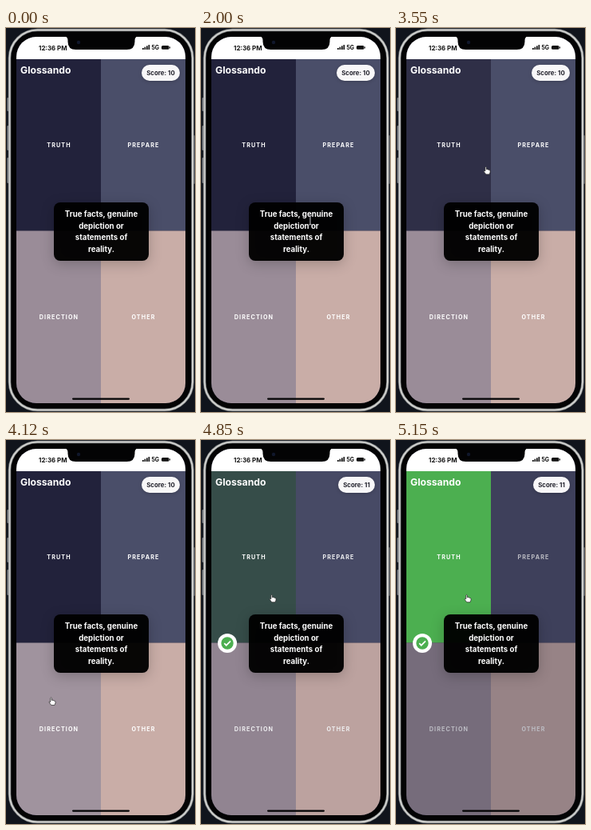
An HTML page for the animation above (6030 ms loop, 237x480 px).

```html
<!DOCTYPE html>
<html lang="en">
<head>
<meta charset="utf-8">
<title>Word quiz</title>
<style>
html, body { margin: 0; width: 100%; height: 100%; overflow: hidden; background: #10141c; }
svg { display: block; width: 237px; height: 480px; font-family: Inter, "Open Sans", sans-serif; font-weight: 700; }
.label { font-size: 7.2px; letter-spacing: 1.1px; fill: #fff; text-anchor: middle; }
.clue { font-size: 9.7px; fill: #fff; text-anchor: middle; }
.popup { filter: drop-shadow(0 4px 8px rgba(0, 0, 0, .22)); }
.pill { filter: drop-shadow(0 1px 2px rgba(0, 0, 0, .2)); }
</style>
</head>
<body>
<svg viewBox="0 0 237 480">
  <defs>
    <clipPath id="screen"><rect x="13" y="11" width="212" height="458" rx="25"/></clipPath>
  </defs>
  <g fill="#8f9397">
    <rect x="1.5" y="87" width="2" height="17" rx="1"/>
    <rect x="1.5" y="122" width="2" height="31" rx="1"/>
    <rect x="1.5" y="162" width="2" height="32" rx="1"/>
    <rect x="235" y="134" width="1.5" height="61" rx=".7"/>
  </g>
  <rect x="4.500" y="2.500" width="229.500" height="475" rx="35" fill="#030304" stroke="#74777a" stroke-width="3.500"/>
  <rect x="4.500" y="2.500" width="229.500" height="475" rx="35" fill="none" stroke="#cfd0cd" stroke-width="2"/>

  <g clip-path="url(#screen)">
    <rect x="13" y="11" width="213" height="459" fill="#22223b"/>
    <g id="tiles"></g>
    <rect x="13" y="11" width="213" height="28" fill="#fff"/>
    <path d="M73 10Q77.500 11 77.500 15V17Q77.500 27 87.500 27H151.500Q161.500 27 161.500 17V15Q161.500 11 166 10Z" fill="#030304"/>
    <circle cx="91" cy="18" r="2.200" fill="#10172b"/>
    <text x="41" y="28" font-size="7.9" fill="#111">12:36 PM</text>
    <g fill="#111">
      <g id="bars"></g>
      <text x="182.500" y="27" font-size="7">5G</text>
      <rect x="195" y="22" width="9.500" height="4.700" rx="1.500"/>
      <rect x="205" y="23.200" width="1" height="2.300" rx=".5"/>
    </g>
    <text x="18" y="56.500" font-size="12.2" fill="#fff">Glossando</text>
    <rect id="pill" class="pill" y="46" height="20" rx="10" fill="#f8f7f8"/>
    <text id="score" y="59" font-size="7.9" fill="#22222c" text-anchor="middle"></text>
    <rect x="83" y="462.500" width="72" height="2.200" rx="1.100" fill="#030304"/>
  </g>

  <rect class="popup" x="60" y="218" width="119" height="73" rx="8" fill="#000" fill-opacity=".96"/>
  <g id="clue" class="clue"></g>

  <g id="badge" transform="translate(33 254)">
    <circle r="12" fill="#fff"/>
    <circle r="7.700" fill="#4caf50"/>
    <path d="M-3.800 .2L-1.300 2.700L4-2.600" fill="none" stroke="#fff" stroke-width="1.700"/>
  </g>

  <path id="arrow" d="M-2-5V4.500L.2 2.600L1.600 6L3 5.400L1.600 2.200H4.500Z" fill="#111" stroke="#e4e4e4" stroke-width=".8"/>
  <path id="beam" d="M-2.300-6Q0-6 0-4.500Q0-6 2.300-6M0-4.500V4.500M-2.300 6Q0 6 0 4.500Q0 6 2.300 6" fill="none" stroke="#a9a9ad" stroke-width="1.200"/>
  <path id="hand" d="M-2.200.8V-4Q-1.500-5.200-.7-4V-1.300Q.3-2 1-1Q2-1.500 2.600-.5Q3.900-.7 4 .6V2.200L3 4.800H-1.200L-3.900 1.300Q-4-.3-2.200.8Z" fill="#fff" stroke="#222" stroke-width=".7"/>
</svg>
<script>
const LOOP = 6030, ENTER = 730, CLICK = 4760, FADE = 390;
const SPLIT_X = 119, SPLIT_Y = 253.5;

// Stops of the pointer: [time, x, y]
const STOPS = [
  [ENTER, 236, 190], [880, 167, 257], [1300, 79, 241], [2000, 137, 240],
  [2400, 116, 272], [2820, 100, 225], [3150, 66, 170], [3450, 66, 170],
  [3700, 185, 190], [3900, 165, 330], [4120, 58, 327], [4400, 44, 225],
  [4670, 90, 198]
];

const $ = id => document.getElementById(id);
const clamp = v => Math.max(0, Math.min(1, v));
const lerp = (a, b, k) => a + (b - a) * k;
const show = (el, on) => el.setAttribute('visibility', on ? 'visible' : 'hidden');

function add(parent, tag, attrs, text = '') {
  const el = document.createElementNS('http://www.w3.org/2000/svg', tag);
  for (const key in attrs) el.setAttribute(key, attrs[key]);
  el.textContent = text;
  return parent.appendChild(el);
}

function makeTile([word, color], i) {
  const right = i % 2, low = i > 1;
  const group = add($('tiles'), 'g', {});
  const box = { x: right ? SPLIT_X : 13, y: low ? SPLIT_Y : 39, width: right ? 107 : SPLIT_X - 13, height: low ? 217 : SPLIT_Y - 39 };
  const fill = color => add(group, 'rect', { ...box, fill: color });
  fill(color);
  const tile = { group, glow: fill('#fff'), win: fill('#4caf50') };
  add(group, 'text', { class: 'label', x: right ? 172.5 : 66.5, y: low ? 364 : 149 }, word);
  return tile;
}

const tiles = [['TRUTH', '#22223b'], ['PREPARE', '#4a4e69'],
               ['DIRECTION', '#9a8c98'], ['OTHER', '#c9ada7']].map(makeTile);

['True facts, genuine', 'depiction or', 'statements of', 'reality.'].forEach((line, i) =>
  add($('clue'), 'text', { x: 119.5, y: 236 + 14.5 * i }, line));

for (let i = 0; i < 4; i++) {
  const height = 2 + 1.3 * i;
  add($('bars'), 'rect', { x: 171 + 2.5 * i, y: 27 - height, width: 1.7, height });
}

function pointer(t) {
  if (t < ENTER) return null;
  const next = STOPS.findIndex(s => s[0] > t);
  if (next < 0) return STOPS[STOPS.length - 1].slice(1);
  const [t0, x0, y0] = STOPS[next - 1], [t1, x1, y1] = STOPS[next];
  const k = (t - t0) / (t1 - t0);
  return [lerp(x0, x1, k), lerp(y0, y1, k)];
}

const overPopup = ([x, y]) => x > 60 && x < 179 && y > 218 && y < 291;

function tileAt(t) {
  const p = pointer(t);
  if (!p || overPopup(p) || p[0] > 225) return -1;
  return (p[0] > SPLIT_X ? 1 : 0) + (p[1] > SPLIT_Y ? 2 : 0);
}

// Share of the last 120 ms spent on a tile, which fades its hover in and out.
function hover(tile, t) {
  let hits = 0;
  for (let ago = 0; ago < 120; ago += 10) hits += tileAt(t - ago) === tile;
  return hits / 12;
}

function draw(t) {
  const solved = t >= CLICK;
  const fade = clamp((t - CLICK) / FADE);

  tiles.forEach((tile, i) => {
    const correct = i === 0;
    tile.glow.setAttribute('opacity', 0.06 * hover(i, t));
    tile.win.setAttribute('opacity', correct ? fade : 0);
    tile.group.setAttribute('opacity', correct ? 1 : 1 - 0.3 * fade);
  });

  const left = solved ? 172 : 170;
  $('pill').setAttribute('x', left);
  $('pill').setAttribute('width', 218 - left);
  $('score').setAttribute('x', (left + 218) / 2);
  $('score').textContent = `Score: ${solved ? 11 : 10}`;
  show($('badge'), solved);

  const p = pointer(t);
  const kind = !p ? '' : t < 950 ? 'arrow' : overPopup(p) ? 'beam' : 'hand';
  for (const id of ['arrow', 'beam', 'hand']) {
    show($(id), id === kind);
    if (id === kind) $(id).setAttribute('transform', `translate(${p})`);
  }
}

const start = performance.now();
function tick() {
  draw((performance.now() - start) % LOOP);
  requestAnimationFrame(tick);
}
tick();
</script>
</body>
</html>
```
